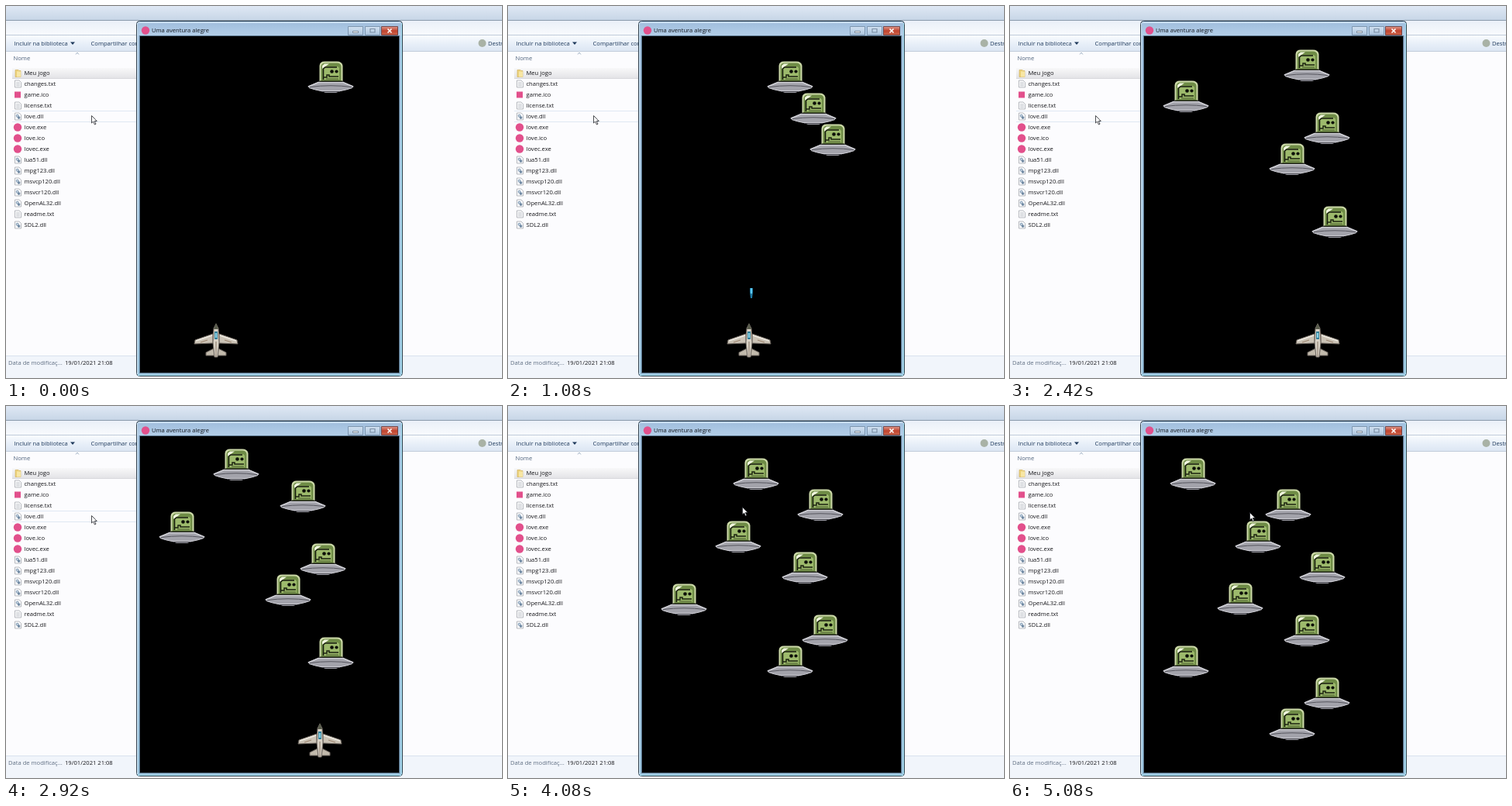
Animation of 640 by 480 pixels, one loop 5.16 s. Source, as an HTML page with a canvas:

```html
<!DOCTYPE html>
<html lang="pt-BR">
<head>
<meta charset="utf-8">
<style>
  html, body { margin: 0; width: 100%; height: 100%; overflow: hidden; background: #fcfcfe; }
  canvas { display: block; }
</style>
</head>
<body>
<canvas id="stage" width="640" height="480"></canvas>
<script>
const ctx = document.getElementById('stage').getContext('2d');
const LOOP = 5160, STEP = 1000 / 12;
const PINK = '#e2508c', NAVY = '#1e395b';

const files = ['Meu jogo', 'changes.txt', 'game.ico', 'license.txt', 'love.dll', 'love.exe', 'love.ico',
  'lovec.exe', 'lua51.dll', 'mpg123.dll', 'msvcp120.dll', 'msvcr120.dll', 'OpenAL32.dll', 'readme.txt', 'SDL2.dll'];

// Motion keys: [time in ms, value]
const scrollKeys = [[0, 0], [1080, 81], [1670, 129], [2420, 187], [3420, 267], [4080, 319], [5160, 406]];
const planeKeys = [[0, 271], [450, 271], [850, 311], [1215, 311], [1415, 357], [1850, 357], [2100, 397], [2800, 397], [2900, 405]];
const cursorX = [[3300, 110], [3400, 115], [3560, 115], [4000, 302], [4500, 302], [4700, 309]];
const cursorY = [[3300, 141], [3400, 137], [3560, 137], [4000, 130], [4500, 130], [4700, 137]];

const ufoX = [389, 364, 334, 379, 197, 353, 267, 373, 290, 329, 206];
const ufoGone = { 0: 3710, 1: 1875 };
const PLANE_GONE = 3710;
// x, y at 1670 ms, time of impact
const bullets = [[314, 132, 9999], [314, 219, 9999], [360.5, 300, 1875]];

function at(keys, t) {
  const next = keys.findIndex(k => k[0] > t);
  if (next < 0) return keys[keys.length - 1][1];
  if (next === 0) return keys[0][1];
  const [t0, a] = keys[next - 1], [t1, b] = keys[next];
  return a + (b - a) * (t - t0) / (t1 - t0);
}

function rect(x, y, w, h, color) {
  ctx.fillStyle = color;
  ctx.fillRect(x, y, w, h);
}

function shape(d, fill, stroke, width = 1) {
  const path = new Path2D(d);
  if (fill) { ctx.fillStyle = fill; ctx.fill(path); }
  if (stroke) { ctx.strokeStyle = stroke; ctx.lineWidth = width; ctx.stroke(path); }
}

function disc(x, y, r, color) {
  ctx.fillStyle = color;
  ctx.beginPath();
  ctx.arc(x, y, r, 0, 7);
  ctx.fill();
}

function text(s, x, y, color = '#16161a') {
  ctx.font = '7.6px "Open Sans", "Noto Sans", sans-serif';
  ctx.textBaseline = 'alphabetic';
  ctx.fillStyle = color;
  ctx.fillText(s, x, y);
}

function gradient(y0, y1, ...colors) {
  const g = ctx.createLinearGradient(0, y0, 0, y1);
  colors.forEach((c, i) => g.addColorStop(i / (colors.length - 1), c));
  return g;
}

function placed(x, y, draw) {
  ctx.save();
  ctx.translate(x, y);
  draw();
  ctx.restore();
}

function fileIcon(name, y) {
  if (name === 'game.ico') return rect(11, y - 4, 8, 8, PINK);
  if (/^love.*(exe|ico)$/.test(name)) return disc(15, y, 5.2, PINK);
  placed(11, y - 5, () => {
    if (!name.includes('.')) {
      shape('M1 1H5L6 2H8V10H1Z', '#ecd27a', '#cfae58', .6);
      return rect(3, 3, 5, 7, '#f7e6a4');
    }
    shape('M.5 .5H6L8.5 3V9.5H.5Z', '#fcfcfe', '#a4a8ae', .8);
    if (name.endsWith('txt')) {
      for (let i = 3; i < 9; i += 2) rect(2, i, 5, .8, '#b4b8be');
    } else {
      disc(3.7, 4.3, 2, '#86a0b8');
      disc(5.6, 6.6, 1.8, '#7089a2');
      disc(3.7, 4.3, .8, '#fcfcfe');
    }
  });
}

function explorer(hover) {
  rect(0, 0, 640, 480, '#fcfcfe');
  rect(0, 0, 640, 19, gradient(0, 19, '#dfe8f4', '#c6d5e6'));
  rect(0, 18, 640, 1, '#8b9bac');
  rect(0, 19, 640, 18, gradient(19, 37, '#eaf0f8', '#f8fafd'));
  rect(0, 37, 640, 1, '#c0ccda');
  rect(0, 38, 640, 20, gradient(38, 58, '#f9fbfe', '#e9f0f9', '#dce6f3'));
  rect(0, 58, 640, 1, '#c2cddb');
  text('Incluir na biblioteca', 10.5, 51, NAVY);
  shape('M83 46.5H89L86 50Z', NAVY);
  text('Compartilhar com', 109.5, 51, NAVY);
  disc(614.5, 48, 5, '#a9b2a6');
  text('Destr', 622, 51, NAVY);
  text('Nome', 9.5, 70, '#4c607a');
  shape('M90 62.5L92 60L94 62.5', null, '#8fa3b8', .8);

  rect(8, 80, 162, 13, gradient(80, 93, '#f8f8f9', '#e4e4e7'));
  rect(8, 93, 162, 1, '#d8d8dc');
  if (hover) shape('M8 135.5H170M8 149.5H170', null, '#dfe8f3');
  files.forEach((name, i) => {
    fileIcon(name, 86.5 + 14 * i);
    text(name, 23.5, 89 + 14 * i);
  });

  rect(0, 451, 640, 29, '#f1f5fb');
  rect(0, 451, 640, 1, '#d9e2ee');
  text('Data de modificaç...', 3, 463, '#5f6e82');
  text('19/01/2021 21:08', 76, 463);
}

function gameWindow() {
  ctx.beginPath();
  ctx.roundRect(168.5, 19.5, 343, 458, 4);
  ctx.fillStyle = gradient(19, 478, '#a3c2e0', '#a9cae4', '#9bc5df');
  ctx.fill();
  ctx.strokeStyle = '#34424f';
  ctx.lineWidth = 1;
  ctx.stroke();
  rect(170, 21, 340, 1, '#dcebf8');
  rect(170, 22, 340, 16, gradient(22, 38, '#a2bfde', '#b3cee8'));
  rect(169, 22, 1, 453, '#cfe5f4');
  rect(510, 22, 1, 453, '#a5e0f0');
  rect(170, 476, 340, 1, '#a5e0f0');
  rect(172, 38, 336, 436, '#59748b');
  rect(173, 39, 334, 434, '#000');
  disc(180, 31.5, 5.2, PINK);
  text('Uma aventura alegre', 188, 34, '#10141a');

  for (const [x, w] of [[441, 20], [463, 20], [484, 22]]) {
    const close = x === 484;
    const fill = close ? gradient(26, 38, '#e0a196', '#c0432e', '#cf6a50') : gradient(26, 38, '#d3e2f1', '#aac4de');
    shape(`M${x + .5} 26.5h${w - 1}v11h${1 - w}Z`, fill, close ? '#643030' : '#6f88a2', .8);
  }
  shape('M447.5 32.5h7v2h-7Z', '#fff', '#56687c', .7);
  shape('M470 29.5h6v4.5h-6Z', null, '#7d90a6', 1.2);
  shape('M492.5 29.5l5 5m0-5l-5 5', null, '#fff', 1.6);
}

function ufo() {
  // Saucer
  shape('M0 33L14 27H46L60 33Q53 37 43 38.5L37 41H23L17 38.5Q7 37 0 33Z', '#a3a3ab');
  shape('M1 33L14 27.5H46L59 33', null, '#d2d2d8', 1.4);
  shape('M3 33.5Q30 30 57 33.5', null, '#55555d', 1);
  shape('M2 34.5Q9 37 17 38.5H43Q51 37 58 34.5', null, '#cdcdd4', 1);
  shape('M18 39.5H42', null, '#404047', 1);
  // Dome
  shape('M15.5 26V6Q16 .5 22 .5H38Q44.5 .5 45.5 6V26Z', '#ccd9a8');
  shape('M17.5 26V7Q18 2.5 23 2.5H38Q43 2.5 43.5 7V26Z', '#6f8c46');
  shape('M20 24V10L23 7H39L41 9V24Z', '#9dba6c');
  shape('M19 10V6L22 3.5H28Z', '#f0f5de');
  // Pilot
  shape('M20.5 24V10L23 8H38', null, '#14190c', 1.5);
  disc(31.5, 13.5, 2.3, '#0d1008');
  disc(37.5, 13.5, 2.1, '#0d1008');
  shape('M21 21H25V18H28V20H40', null, '#1b220f', 1.5);
  rect(24, 22.5, 16, 1, '#445628');
  rect(16, 25.5, 29, 1.3, '#1c2014');
}

function plane() {
  const outline = '#6c655e';
  shape('M-4 14L-27 22L-28 27L-4 26ZM4 14L27 22L28 27L4 26Z', '#cbc3b6', outline);
  shape('M-5 16L-26 23M5 16L26 23', null, '#efebe2', 1.4);
  shape('M-20 25L-11 22M20 25L11 22', null, '#9c8670', 1.2);
  shape('M-3 33L-13 38V42L-2 42ZM3 33L13 38V42L2 42Z', '#c2baac', outline);
  shape('M0 1L3 7L4 25L2 44H-2L-4 25L-3 7Z', '#d8d1c5', outline);
  shape('M0 0L3 8H-3Z', '#595c4c');
  rect(-2, 11, 4, 10, '#347f98');
  rect(-1, 13, 2, 6, '#8ed5e8');
  rect(-.5, 24, 1, 19, '#857766');
}

function bullet() {
  shape('M-2 -6H2V-1L1 7H-1L-2 -1Z', '#207ea8');
  rect(-1, -6, 2, 7, '#5fc9f0');
}

function game(t) {
  ctx.save();
  ctx.beginPath();
  ctx.rect(173, 39, 334, 434);
  ctx.clip();
  const scroll = at(scrollKeys, t);
  for (const [x, y, impact] of bullets) {
    const now = y - .405 * (t - 1670);
    if (now <= 404 && t < impact) placed(x, Math.round(now), bullet);
  }
  ufoX.forEach((x, i) => {
    const y = Math.round(71 - 40.4 * i + scroll);
    if (y >= 45 && t < (ufoGone[i] ?? Infinity)) placed(x, y, ufo);
  });
  if (t < PLANE_GONE) placed(Math.round(at(planeKeys, t)), 409, plane);
  ctx.restore();
}

function cursor(x, y) {
  placed(x, y, () =>
    shape('M.5 .5V10L2.7 8L4.4 12L6 11.2L4.3 7.5H7.3Z', '#fff', '#202228', .8));
}

function render() {
  // Twelve steps per second, each starting on a 10 ms boundary
  const clock = Math.floor(performance.now() % LOOP / 10);
  const t = Math.floor((clock + .5) * .12) * STEP;
  const mouseX = at(cursorX, t);
  explorer(mouseX < 168);
  gameWindow();
  game(t);
  cursor(mouseX, at(cursorY, t));
  requestAnimationFrame(render);
}
render();
</script>
</body>
</html>
```
